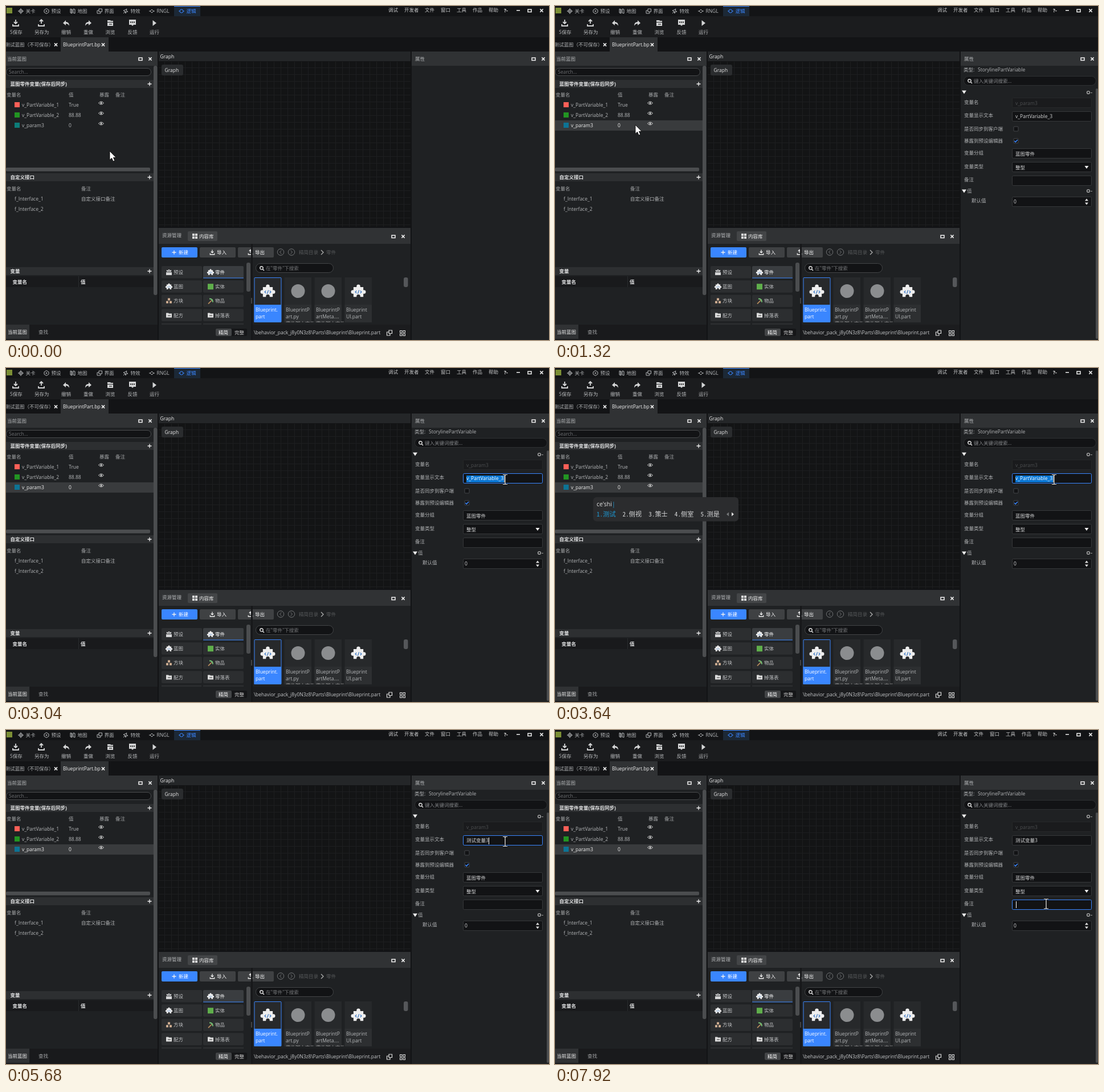
Animation, 953 px wide and 587 px high, one loop 8000 ms. Source, as an HTML page:

```html
<!DOCTYPE html>
<html lang="zh-CN">
<head>
<meta charset="utf-8">
<title>Blueprint editor</title>
<style>
html,body{margin:0;width:100%;height:100%;overflow:hidden;background:#121315}
svg{display:block;width:100%;height:100%}
text{font:8.5px 'Open Sans','Noto Sans CJK SC','Noto Sans CJK',sans-serif;white-space:pre}
.b{font-weight:700}
.ime{font:11.2px 'Noto Sans Mono CJK SC','Noto Sans CJK SC',monospace}
.pre{font-size:10.5px}
</style>
</head>
<body>
<svg id="stage" viewBox="0 0 953 587" xmlns="http://www.w3.org/2000/svg"></svg>
<script>
const LIGHT = '#d4d5d6', GREY = '#a2a4a6', DIM = '#6d6f72', BLUE = '#3a86ff';
const BODY = '#1f2123', BAR = '#303234', FIELD = '#121315';

// Drawing helpers: each returns SVG markup; text is placed by its middle line.
const rect = (x, y, w, h, fill, more = '') =>
  `<rect x="${x}" y="${y}" width="${w}" height="${h}" fill="${fill}" ${more}/>`;
const box = (x, y, w, h, fill, line, r = 2, more = '') =>
  rect(x + .5, y + .5, w - 1, h - 1, fill, `stroke="${line}" rx="${r}" ${more}`);
const text = (x, y, s, fill = LIGHT, more = '') =>
  `<text x="${x}" y="${y + 3}" fill="${fill}" ${more}>${s}</text>`;
const line = (x, y, d, color = LIGHT, w = 1.2) =>
  `<path transform="translate(${x} ${y})" d="${d}" fill="none" stroke="${color}" stroke-width="${w}"/>`;
const solid = (x, y, d, color = LIGHT) =>
  `<path transform="translate(${x} ${y})" d="${d}" fill="${color}"/>`;
const bold = (x, y, s) => text(x, y, s, '#e4e5e6', 'class="b"');

const close = (x, y) => line(x, y, 'M-2.6-2.6 2.6 2.6M2.6-2.6-2.6 2.6', '#eee', 1.5);
const maximise = (x, y) => line(x, y, 'M-3-2H3V2.5H-3Z', '#eee', 1.5);
const plus = (x, y) => line(x, y, 'M-3.5 0H3.5M0-3.5V3.5', '#eee', 1.3);
const lens = (x, y) => line(x, y, 'M2.2-.6A2.7 2.7 0 1 1-3.2-.6 2.7 2.7 0 1 1 2.2-.6M1.4 1.4 4 4', '#e4e4e4', 1.4);
const eye = (x, y) => line(x, y, 'M-4.5 0Q0-5 4.5 0 0 5-4.5 0Z', '#d0d0d0', 1) +
  `<circle cx="${x}" cy="${y}" r="1.5" fill="#d0d0d0"/>`;
const gear = (x, y) => `<circle cx="${x}" cy="${y}" r="2.4" fill="none" stroke="#aaa" stroke-width="1.4"/>` +
  rect(x + 4, y, 3, 1, '#999');
const download = 'M0-6V1M-3-2 0 1 3-2M-5 2V5H5V2';
const upload = 'M0 1V-6M-3-3 0-6 3-3M-5 2V5H5V2';
const scale = (x, y, k, s) => `<g transform="translate(${x} ${y}) scale(${k})">${s}</g>`;
const puzzle = (x, y, k) => scale(x, y, k,
  solid(0, 0, 'M-8-7H-3V-8A3 3 0 0 1 3-8V-7H8V-2H9A3 3 0 0 1 9 4H8V9H3V8A3 3 0 0 0-3 8V9H-8V4H-9A3 3 0 0 1-9-2H-8Z', '#eee') +
  line(0, 1, 'M-3-2-5 0-3 2M3-2 5 0 3 2M1-3-1 3', '#2d6fc0', 1.1));
const folder = (x, y) => solid(x, y, 'M-5-4H-1L0-3H5V4H-5Z', '#ddd') + rect(x - 2, y, 5, 1, '#333');

function menuBar() {
  let s = rect(0, 0, 953, 18, '#131416') + rect(295, 0, 46, 18, '#1c2836') + rect(295, 0, 46, 1, BLUE) +
    rect(1, 3, 10, 10, '#7c8f35');
  const icons = [
    'M-5 0H5M0-5V5M3 0A3 3 0 1 1-3 0 3 3 0 1 1 3 0',
    'M0-4.5 4-2V2L0 4.5-4 2V-2ZM-1.5 0H1.5M0-1.5V1.5',
    'M-4-4V3L-1 4V-3ZM1-4V3L4 4V-3ZM-2-3V3',
    'M-1-4H4.5V1H-1ZM-1-1H-4V4H2V1',
    'M-4 4 0 0M2-4 1-1 4 1 1 1 0 4-1 1-4-1-1-2Z',
    'M-5 0H-3L0-3 3 0 0 3-3 0M3 0H5',
    'M-5 0H-3M3 0H5M3 0A3 3 0 1 1-3 0 3 3 0 1 1 3 0'];
  ['关卡', '预设', '地图', '界面', '特效', 'RNGL', '逻辑'].forEach((name, i) => {
    const x = [26, 71, 117, 164, 210, 256, 308][i], c = i == 6 ? BLUE : '#b4b6b8';
    s += line(x, 9, icons[i], c, 1) + text(x + 8.4, 9, name, c);
  });
  [[671, '调试'], [699, '开发者'], [735, '文件'], [763, '窗口'], [791, '工具'], [819, '作品'], [847, '帮助']]
    .forEach(([x, name]) => s += text(x, 7, name, '#c4c5c6'));
  return s + text(874, 7.5, '?-', '#eee', 'class="b"') + rect(896, 7, 6, 1.5, '#eee') +
    maximise(919, 8) + close(940, 8);
}

function toolBar() {
  const tools = [[17, 7, 'S保存'], [62, 50, '另存为'], [106, 97, '撤销'], [144, 136, '重做'],
    [183, 174.5, '浏览'], [222, 213.5, '反馈'], [260, 252, '运行']];
  let s = rect(0, 18, 953, 37, '#1b1c1e') + tools.map(([, x, name]) => text(x, 46, name, '#b8babc')).join('');
  s += line(17, 30, download, LIGHT, 1.8) + line(62, 30, upload, LIGHT, 1.8);
  const undo = 'M-6-1-1-6V-3Q5-3 5 4 3 0-1 0V3Z';
  s += solid(106, 31, undo) + `<g transform="matrix(-1 0 0 1 288 0)">${solid(144, 31, undo)}</g>`;
  s += solid(183, 30, 'M-5-5H0L1-4H5V-2H-5ZM-5-1H5V5H-5Z') + line(183, 30, 'M-2 2H3', '#222') +
    solid(222, 30, 'M-6-6H6V3H2L0 5-2 3H-6Z') + line(222, 28.5, 'M-4 0H-2M-1 0H1M2 0H4', '#222', 1.8) +
    solid(260, 30, 'M-2.5-5 4 0-2.5 5Z');
  return s + rect(0, 55, 953, 25, '#131416') + text(-1.5, 68, '测试蓝图（不可保存）', '#b0b2b4') + close(87.5, 68) +
    rect(96, 55, 84, 25, BAR) + text(100, 68, 'BlueprintPart.bp', '#f0f0f0') + close(170.5, 68);
}

const panelHead = (x, w, name, y = 80, h = 25) => rect(x, y, w, h, BAR) + text(x + (x ? 6 : 2), y + 13, name, '#b4b6b8');
const section = (y, name) => rect(0, y - 7, 259, 14, '#2d2f31') + bold(7.5, y, name) + plus(252, y);

function leftPanel() {
  let s = rect(0, 80, 266, 507, BODY) + panelHead(0, 266, '当前蓝图') + maximise(236, 93) + close(253, 93) +
    box(0, 109, 255, 14, FIELD, '#4a4c4e', 6.5) + text(5, 116, 'Search...', DIM) +
    section(137, '蓝图零件变量(保存后同步)');
  [[1, '变量名'], [110, '值'], [164, '暴露'], [192, '备注']].forEach(([x, n]) => s += text(x, 156, n, GREY));
  s += '<rect id="row" x="0" y="201" width="259" height="18"/>';
  [['v_PartVariable_1', 'True', '#ff5f57'], ['v_PartVariable_2', '88.88', '#229422'], ['v_param3', '0', '#0d7c78']]
    .forEach(([name, value, c], i) => {
      const y = 174 + 18 * i;
      s += rect(15, y - 5, 9, 9, c, `id="chip${i}"`) + text(28, y, name, '#b6b8ba', `id="name${i}"`) +
        text(110, y, value, '#b6b8ba', `id="value${i}"`) + eye(167, y - 3.5);
    });
  s += rect(0, 284, 253, 6.5, '#4b4d4f', 'rx="2"') + section(301, '自定义接口') +
    text(1, 321, '变量名', GREY) + text(132, 321, '备注', GREY) +
    text(15, 338.5, 'f_Interface_1', '#b0b2b4') + text(132, 338.5, '自定义接口备注', '#b0b2b4') +
    text(15, 356.5, 'f_Interface_2', '#b0b2b4') + section(466, '变量') +
    rect(0, 475, 259, 19, '#191a1c') + rect(127, 475, 1, 19, '#2a2c2e') + bold(11.5, 485, '变量名') + bold(131, 485, '值');
  return s + rect(259, 105, 6.5, 403, '#4b4d4f', 'rx="3"') + rect(0, 560, 266, 27, '#191a1c') +
    rect(0, 560, 41, 25, BAR) + text(3, 573, '当前蓝图', '#f0f0f0') + text(57, 573, '查找', GREY);
}

function graphPanel() {
  let grid = '';
  for (let x = 278; x < 710; x += 12) grid += `M${x}.5 98V388`;
  for (let y = 108; y < 388; y += 12) grid += `M268 ${y}.5H710`;
  return rect(268, 80, 442, 17, '#242628') + text(270.5, 89, 'Graph', '#eee') + rect(268, 97, 442, 291, '#131415') +
    line(0, 0, grid, '#1d1e20', 1) + rect(273, 103, 38, 19, '#2a2c2e', 'rx="3"') + text(278.5, 112.5, 'Graph', '#e4e4e4');
}

function resourcePanel() {
  let s = rect(268, 390, 442, 197, BODY) + panelHead(268, 442, '资源管理', 390, 28) +
    rect(319, 396, 52, 17, '#434547', 'rx="2"') + text(339, 405, '内容库', '#eee') + maximise(680, 405) + close(697, 405);
  const tiles = (x, y, k = 4) => [0, 1, 2, 3].map(i => rect(x + (i % 2) * 5, y + (i >> 1) * 5, k, k, '#ddd')).join('');
  s += tiles(327, 400);
  [[273, '新建', BLUE], [340, '导入', '#3f4143'], [407, '导出', '#3f4143']].forEach(([x, n, c]) =>
    s += rect(x, 424, 63, 18, c, 'rx="2"') + text(x + 30, 433, n, '#fff', 'class="m"'));
  s += plus(295, 433) + scale(362, 433, .75, line(0, 0, download, '#eee', 1.7)) + scale(429, 433, .75, line(0, 0, upload, '#eee', 1.7));
  [[482, 'M1.5-3-1.5 0 1.5 3'], [501, 'M-1.5-3 1.5 0-1.5 3']].forEach(([x, d]) =>
    s += `<circle cx="${x}" cy="432.5" r="5.7" fill="none" stroke="#737577"/>` + line(x, 432.5, d, '#737577', 1));
  s += text(514, 433, '精简目录', '#56585a') + line(555, 433, 'M-2-4 2 0-2 4', '#aaa', 1.4) + text(562, 433, '零件', '#56585a');

  ['预设', '零件', '蓝图', '实体', '方块', '物品', '配方', '掉落表'].forEach((name, i) => {
    const x = i % 2 ? 346 : 273, y = 457 + (i >> 1) * 25.2, on = i == 1, cx = x + 13, cy = y + 11;
    s += rect(x, y, 71, 21.5, on ? '#3a3d40' : '#2c2e30', 'rx="2"') + text(x + 21, y + 11, name, on ? '#fff' : '#c0c2c4');
    if (on) s += rect(x, y + 20.5, 71, 1, BLUE);
    s += [
      () => solid(cx, cy, 'M-5 0H5V5H-5ZM-4-2H4V-1H-4ZM-1-5H1V-2H-1ZM-4-4H-2V-2H-4ZM2-4H4V-2H2Z'),
      () => puzzle(cx, cy, .52), () => puzzle(cx, cy, .52),
      () => rect(cx - 5, cy - 5, 10, 10, '#5fae4b'),
      () => solid(cx, cy, 'M-2-5H2V-1H-2ZM-5 0H-1V4H-5ZM1 0H5V4H1Z', '#cfae92'),
      () => line(cx, cy, 'M-4 5 2-1', '#b58b5c', 1.8) + line(cx, cy, 'M-2-4Q4-4 4 2', '#78c878', 2),
      () => folder(cx, cy), () => folder(cx, cy)][i]();
  });
  s += rect(273, 557.5, 70, 2.5, '#2c2e30') + rect(346, 557.5, 71, 2.5, '#2c2e30') +
    rect(422, 451, 7, 51, '#4b4d4f', 'rx="3"') + rect(368, 567, 55, 13, '#151618', 'rx="2"') +
    rect(368, 567, 28, 13, '#434547', 'rx="2"') + text(373, 573.5, '精简', '#fff') + text(401, 573.5, '完整', '#c8c8c8') +
    rect(430, 418, 3, 169, '#17181a') + line(431, 518, 'M0-5V5', '#888', .8) +
    box(438, 452, 137, 17, FIELD, '#434547', 8) + lens(449, 461) + text(456, 460.5, '在"零件"下搜索', '#747678');

  [['Blueprint.', 'part'], ['BlueprintP', 'art.py'], ['BlueprintP', 'artMeta....'], ['Blueprint', 'UI.part']].forEach(([a, b], i) => {
    const x = 435.5 + 53 * i, mid = x + 24, on = !i;
    s += rect(x, 477, 47.5, 79, '#27292b') + rect(x, 525, 47.5, 31, on ? BLUE : '#2d2f31');
    if (on) s += box(x, 477, 48, 79, 'none', BLUE, 1);
    s += i % 3 ? `<circle cx="${mid}" cy="501" r="12" fill="#8b8d8f"/>` : puzzle(mid, 501.5, 1.08);
    const c = on ? '#fff' : '#b6b8ba';
    s += text(x + 2.5, 534, a, c) + text(x + 2.5, 546, b, c);
    if (i == 1 || i == 2) s += `<g clip-path="url(#cut)">${text(x + 2.5, 557.5, '零件脚本文件', '#999')}</g>`;
  });
  return s + rect(698, 477, 7.5, 17, '#55575a', 'rx="3"') + rect(433, 560, 277, 27, '#1b1c1e') +
    text(435, 573.5, '\\behavior_pack_j8y0N3z8\\Parts\\Blueprint\\Blueprint.part', '#c4c6c8') +
    line(673, 574.5, 'M-1-4.5H4.5V1H-1ZM-1-1.5H-4.5V4.5H1V1', '#ddd', 1.2) +
    [0, 1, 2, 3].map(i => box(691 + (i % 2) * 5.5, 570 + (i >> 1) * 5.5, 4.5, 4.5, 'none', '#ddd', 0)).join('');
}

const field = (y, id = '') => box(802, y, 140, 18, FIELD, '#36383a', 2, id && `id="${id}"`);
function properties() {
  let s = text(717, 112, '类型:', '#b4b6b8') + text(742, 112, 'StorylinePartVariable', '#b4b6b8') +
    box(717, 123, 233, 17, FIELD, '#2e3032', 8) + lens(728, 132) + text(735, 131.5, '键入关键词搜索...', '#85878a');
  const fold = y => solid(718, y, 'M-4-2.5H4L0 3.5Z', '#eee');
  s += fold(151) + gear(936, 152) + fold(325) + text(723, 325, '值', GREY) + gear(936, 325);
  ['变量名', '变量显示文本', '是否同步到客户端', '暴露到预设编辑器', '变量分组', '变量类型', '备注'].forEach((n, i) =>
    s += text(718, [168.5, 192, 216, 237, 258, 281.5, 305][i], n, '#b0b2b4'));
  s += text(731, 342, '默认值', '#b0b2b4') + box(802, 161, 140, 18, '#1a1b1d', '#262829') + text(808, 170.5, 'v_param3', '#4c4e50') +
    field(185, 'field1') + rect(808, 189, 66, 12, '#0a78d6', 'id="mark"') + text(808, 194, '', LIGHT, 'id="label"') +
    box(804.5, 211.5, 9, 9, FIELD, '#45474a', 1) + box(804.5, 232.5, 9, 9, FIELD, '#45474a', 1) +
    line(809, 237.3, 'M-2.8-.3-.8 1.8 2.8-2', BLUE, 1.6) +
    field(250) + text(808, 259.5, '蓝图零件') + field(274) + text(808, 283.5, '整型') + solid(933, 283, 'M-3.5-2H3.5L0 3Z', '#eee') +
    field(298, 'field2') + field(335) + text(805, 344, '0') +
    solid(933, 344, 'M-3-1.5H3L0-5.5ZM-3 1.5H3L0 5.5Z', '#ddd') +
    rect(949, 145, 4, 440, '#4b4d4f', 'rx="2"') + rect(0, 190, 1, 11, '#fff', 'id="caret"');
  return s;
}

document.getElementById('stage').innerHTML =
  '<defs><clipPath id="cut"><rect x="433" y="551" width="277" height="5"/></clipPath></defs>' +
  rect(0, 0, 953, 587, '#121315') + menuBar() + toolBar() + leftPanel() + graphPanel() + resourcePanel() +
  rect(712, 80, 241, 507, BODY) + panelHead(712, 241, '属性') + maximise(926, 93) + close(943, 93) +
  `<g id="props">${properties()}</g><g id="ime"></g>` +
  '<path id="arrow" d="M0 0V15.5L3.6 12.3 6 18 8.8 16.8 6.4 11.3H11Z" fill="#fff" stroke="#000" stroke-width=".8"/>' +
  '<g id="beam" fill="none"><path d="M-4-8.5H-1L0-7.5 1-8.5H4M0-7.5V7.5M-4 8.5H-1L0 7.5 1 8.5H4" stroke="#000" stroke-width="2.6"/>' +
  '<path d="M-4-8.5H-1L0-7.5 1-8.5H4M0-7.5V7.5M-4 8.5H-1L0 7.5 1 8.5H4" stroke="#fff" stroke-width="1.2"/></g>';

const LOOP = 8000;
const $ = id => document.getElementById(id);
const set = (id, attrs) => { for (const k in attrs) $(id).setAttribute(k, attrs[k]); };
const show = (id, on) => set(id, { visibility: on ? 'visible' : 'hidden' });
const within = (t, spans) => spans.some(([a, b]) => t >= a && t < b);
const last = (t, steps) => steps.filter(s => t >= s[0]).pop();

// Pointer stops: time, x, y.
const path = [[0, 182, 255], [240, 182, 255], [520, 138, 211], [1280, 138, 211], [1320, 141, 209], [2120, 876, 196],
  [5680, 876, 196], [5960, 863, 306], [6200, 863, 306], [6320, 862, 305.5], [LOOP, 862, 305.5]];
function pointer(t) {
  const i = Math.max(1, path.findIndex(p => p[0] > t));
  const [a, b] = [path[i - 1], path[i]], k = (t - a[0]) / (b[0] - a[0]), e = k * k * (3 - 2 * k);
  return [a[1] + (b[1] - a[1]) * e, a[2] + (b[2] - a[2]) * e];
}

// Field contents: time, text, caret position.
const typed = [[0, 'v_PartVariable_3', 874], [3680, '测试', 825], [4440, '测试变量', 842], [4640, '测试变量3', 847]];
// Input popup: time, keys, choices, left, top; no keys means closed.
const testWords = '测试 侧视 策士 侧室 测是', varWords = '变量 边梁 变凉 便量 变亮';
const popups = [[0], [3320, 'c', '才 从 次 出 成', 67, 227], [3400, 'ce', '测 侧 册 策 厕', 67, 227],
  [3480, "ce's", testWords, 67, 227], [3560, "ce'sh", testWords, 67, 227], [3640, "ce'shi", testWords, 67, 227], [3680],
  [3880, 'b', '吧 把 被 不 比', 826, 207], [3960, 'bi', '比 笔 必 闭 币', 826, 221], [4080, 'bian', '变 边 遍 便 编', 826, 221],
  [4240, "bian'l", varWords, 826, 221], [4320, "bian'liang", varWords, 826, 221], [4440]];

function popup([, keys, words, x, y]) {
  if (!keys) return '';
  let at = x + 6, s = '';
  words.split(' ').forEach((w, i) => {
    s += text(at, y + 30.5, `${i + 1}.${w}`, i ? '#d6d7d8' : '#1c9ad6', 'class="ime"');
    at += 11.2 * (w.length + 1) + 12;
  });
  return rect(x, y, at - x + 21, 42.5, '#2b2c2e', 'rx="6"') +
    text(x + 6, y + 12.5, `${keys}<tspan fill="#1c9ad6">|</tspan>`, '#e4e4e4', 'class="pre"') + s +
    solid(at + 3, y + 30, 'M-3 0 1-3.5V3.5Z', '#77797b') + solid(at + 10, y + 30, 'M3 0-1-3.5V3.5Z', '#ddd');
}

let shownPopup;
function draw(ms) {
  const t = Math.floor(ms / 40) * 40;
  const [x, y] = pointer(t);
  const picked = t >= 680;
  set('row', { fill: picked ? '#393b3d' : t >= 440 ? '#2c2e30' : 'none' });
  set('chip2', { fill: picked ? '#0d7394' : '#0d7c78' });
  ['name2', 'value2'].forEach(id => set(id, { fill: picked ? '#f0f0f0' : '#b6b8ba' }));

  const open = t >= 760;
  $('props').style.display = open ? '' : 'none';
  const over = top => x > 802 && x < 942 && y >= top && y <= top + 18;
  const first = t >= 2280 && t < 6760, second = t >= 6760;
  const edge = (focus, top) => focus ? BLUE : over(top) ? '#747678' : '#36383a';
  set('field1', { stroke: edge(first, 185) });
  set('field2', { stroke: edge(second, 298) });

  const [, value, end] = last(t, typed), marked = t >= 2360 && t < 3680;
  $('label').textContent = value;
  set('label', { fill: marked ? '#fff' : LIGHT });
  $('mark').style.display = marked ? '' : 'none';
  const lit = first ? within(t, [[2280, 2720], [3040, 5280], [5680, 6200]])
    : within(t, [[6760, 7120], [7520, 7800], [7920, LOOP]]);
  set('caret', { x: first ? end : 809, y: first ? 189 : 301, height: 12 });
  $('caret').style.display = lit ? '' : 'none';

  const p = last(t, popups);
  if (p !== shownPopup) $('ime').innerHTML = popup(shownPopup = p);

  const beam = open && [185, 250, 298].some(over);
  show('arrow', !beam);
  show('beam', beam);
  set(beam ? 'beam' : 'arrow', { transform: `translate(${x} ${y})` });
}

const start = performance.now();
function tick() {
  draw((performance.now() - start) % LOOP);
  requestAnimationFrame(tick);
}
tick();
</script>
</body>
</html>
```
